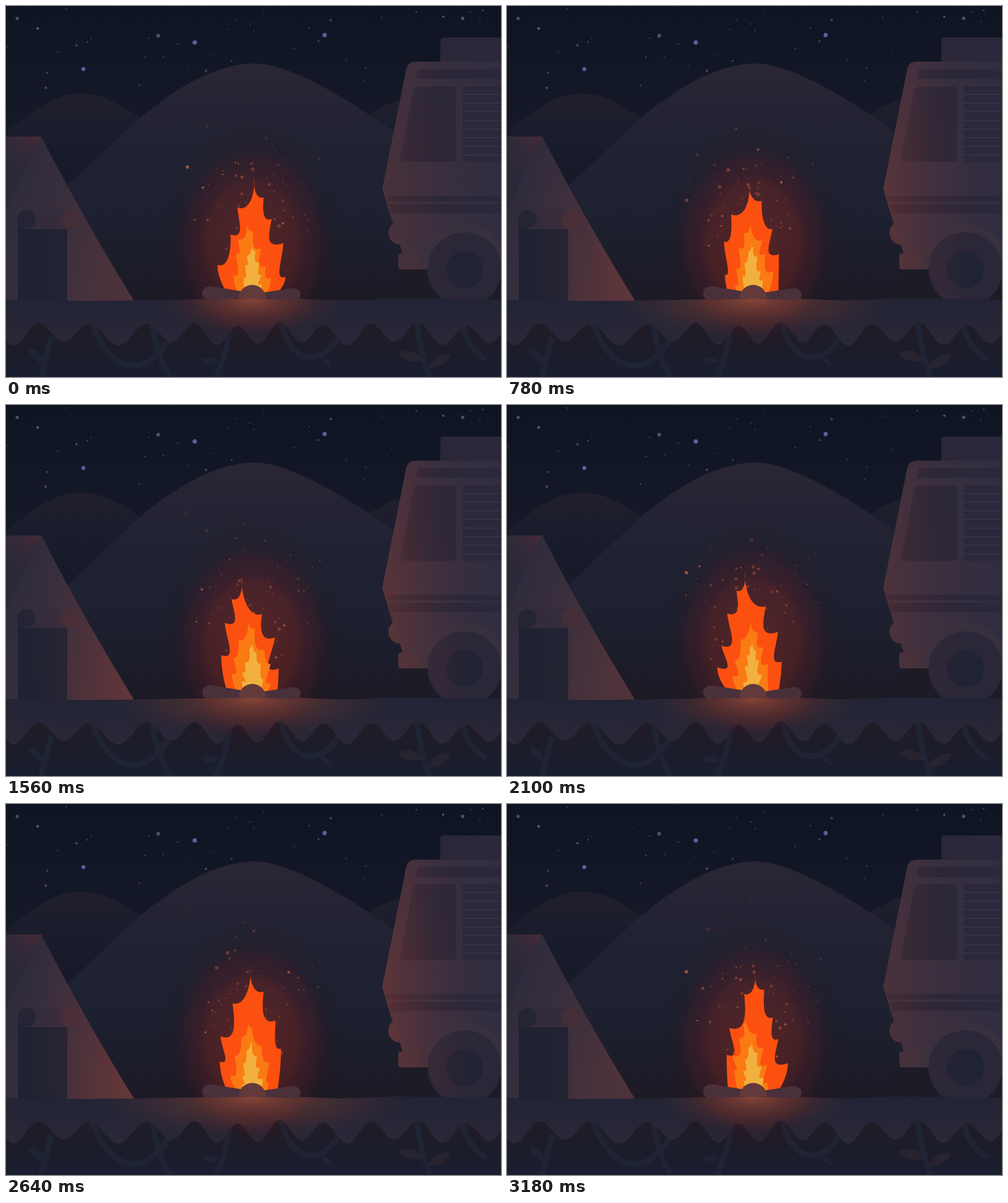
These frames come from a looping animation (800 px wide and 600 px high, 3.24 s). An HTML page:

```html
<!DOCTYPE html>
<html lang="en">
<head>
<meta charset="utf-8">
<title>Campfire</title>
<style>
  html, body { margin: 0; width: 100%; height: 100%; overflow: hidden; background: #101523; }
  svg { display: block; width: 800px; height: 600px; }
</style>
</head>
<body>
<svg viewBox="0 0 800 600">
  <defs>
    <linearGradient id="sky" x2="0" y2="1">
      <stop stop-color="#0f1423"/><stop offset=".4" stop-color="#161a29"/><stop offset="1" stop-color="#191a26"/>
    </linearGradient>
    <linearGradient id="farHill" gradientUnits="userSpaceOnUse" x1="0" y1="140" x2="0" y2="260">
      <stop stop-color="#211f2e"/><stop offset=".7" stop-color="#191c2c"/><stop offset="1" stop-color="#161a29"/>
    </linearGradient>
    <linearGradient id="nearHill" gradientUnits="userSpaceOnUse" x1="0" y1="93" x2="0" y2="476">
      <stop stop-color="#2a2636"/><stop offset=".32" stop-color="#212232"/><stop offset=".6" stop-color="#1d2131"/>
      <stop offset="1" stop-color="#1c1a25"/>
    </linearGradient>
    <linearGradient id="soil" gradientUnits="userSpaceOnUse" x1="0" y1="510" x2="0" y2="600">
      <stop stop-color="#201c26"/><stop offset=".4" stop-color="#1d1c28"/><stop offset="1" stop-color="#191e30"/>
    </linearGradient>
    <linearGradient id="turf" gradientUnits="userSpaceOnUse" x1="0" y1="473" x2="0" y2="550">
      <stop stop-color="#222435"/><stop offset=".4" stop-color="#252536"/><stop offset="1" stop-color="#2b2838"/>
    </linearGradient>
    <linearGradient id="vanBody" gradientUnits="userSpaceOnUse" x1="608" y1="0" x2="800" y2="0">
      <stop stop-color="#42303b"/><stop offset=".45" stop-color="#382f3f"/><stop offset="1" stop-color="#312d40"/>
    </linearGradient>
    <linearGradient id="vanDark" gradientUnits="userSpaceOnUse" x1="615" y1="0" x2="770" y2="0">
      <stop stop-color="#392934"/><stop offset=".55" stop-color="#2a2738"/><stop offset="1" stop-color="#2a283a"/>
    </linearGradient>
    <linearGradient id="tentFront" gradientUnits="userSpaceOnUse" x1="0" y1="330" x2="175" y2="400">
      <stop stop-color="#302c3d"/><stop offset=".55" stop-color="#392f3d"/><stop offset="1" stop-color="#45313b"/>
    </linearGradient>
    <linearGradient id="tentSide" gradientUnits="userSpaceOnUse" x1="0" y1="270" x2="50" y2="215">
      <stop stop-color="#2a2839"/><stop offset=".6" stop-color="#322a39"/><stop offset="1" stop-color="#422b36"/>
    </linearGradient>
    <radialGradient id="cast" gradientUnits="userSpaceOnUse" cx="398" cy="400" r="420"
      gradientTransform="translate(0 -400) scale(1 2)">
      <stop offset=".45" stop-color="#c04a34" stop-opacity=".34"/>
      <stop offset=".62" stop-color="#b04030" stop-opacity=".18"/>
      <stop offset=".86" stop-color="#903030" stop-opacity="0"/>
    </radialGradient>
    <radialGradient id="halo">
      <stop stop-color="#8a2c20" stop-opacity=".56"/>
      <stop offset=".48" stop-color="#76241f" stop-opacity=".48"/>
      <stop offset=".57" stop-color="#5c1c22" stop-opacity=".44"/>
      <stop offset=".7" stop-color="#4d1a21" stop-opacity=".36"/>
      <stop offset=".8" stop-color="#33161d" stop-opacity=".2"/>
      <stop offset="1" stop-color="#241219" stop-opacity="0"/>
    </radialGradient>
    <radialGradient id="pool">
      <stop stop-color="#d07048" stop-opacity=".42"/><stop offset=".45" stop-color="#b0502f" stop-opacity=".24"/>
      <stop offset="1" stop-color="#903828" stop-opacity="0"/>
    </radialGradient>
    <clipPath id="onTurf"><path class="turf"/></clipPath>
  </defs>

  <rect width="800" height="600" fill="url(#sky)"/>
  <g id="stars"></g>
  <path d="M0 205C40 172 75 142 120 142S190 165 218 181L330 260V480H0Z" fill="url(#farHill)"/>
  <path d="M540 205L585 176Q640 142 700 138L800 160V480H540Z" fill="url(#farHill)"/>
  <path d="M0 378L100 290L215 182C290 120 350 93 402 93S540 142 615 195L720 275V480H0Z" fill="url(#nearHill)"/>

  <path d="M0 211H57L0 331Z" fill="url(#tentSide)"/>
  <path d="M57 211Q133 358 209 480H0V331Z" fill="url(#tentFront)"/>
  <path d="M19 345H99V480H19Z" fill="#1f2232"/>
  <rect x="18" y="329" width="102" height="32" rx="16" fill="#332c3b"/>
  <circle cx="33" cy="345" r="15" fill="#252435"/>
  <circle cx="104" cy="345" r="16" fill="#402d38"/>
  <path class="cast" d="M0 211H57Q133 358 209 480H0Z" fill="url(#cast)"/>

  <path d="M702 92V56Q702 51 707 51H800V92Z" fill="url(#vanDark)"/>
  <circle cx="637" cy="367" r="19" fill="#42303b"/>
  <path d="M662 90H800V426H650L641 400L608 296L647 101Q650 90 662 90Z" fill="url(#vanBody)"/>
  <path d="M666 102H800V118H662ZM614 307H800V316H616ZM618 320H800V335H622Z" fill="url(#vanDark)"/>
  <path d="M667 130H722Q727 130 727 136V246Q727 252 721 252H642Q636 252 637 246L658 137Q660 130 667 130Z" fill="url(#vanDark)"/>
  <path d="M738 130H800V252H738Z" fill="#2a283a"/>
  <path id="slats" stroke="#373144" stroke-width="2"/>
  <path d="M640 400H690V480H640ZM690 426H800V480H690Z" fill="#1d1b25"/>
  <path d="M639 400H700V426H639Q634 426 634 421V405Q634 400 639 400Z" fill="#40303b"/>
  <path d="M669 426A72 73 0 0 1 813 426Z" fill="#38303e"/>
  <circle cx="741" cy="426" r="60" fill="#2a2738"/>
  <circle cx="741" cy="426" r="30" fill="#202334"/>
  <path class="cast" fill="url(#cast)" d="M702 90V56Q702 51 707 51H800V480H715Q690 465 682 426H639Q634 426 634 421V405Q634 400 641 400L637 386A19.2 19.2 0 0 1 624 353L608 296L647 101Q650 90 662 90Z"/>

  <path d="M0 500H800V600H0Z" fill="url(#soil)"/>
  <path fill="none" stroke="#1f2435" stroke-width="9" d="M139 512C155 560 180 582 208 582Q238 580 265 538M237 510Q240 560 266 602M363 512Q359 560 338 602M444 510C455 555 475 569 495 568Q522 564 537 536M73 536L56 602M663 506Q669 560 686 602M737 512Q743 550 776 572"/>
  <path d="M633 563Q655 548 676 573Q648 580 633 563M682 586Q690 562 718 564Q710 585 682 586" fill="#28242f"/>
  <path d="M36 554Q60 556 61 579Q40 574 36 554M315 572Q330 563 344 574Q328 584 315 572M508 569Q522 568 526 584Q514 582 508 569" fill="#1f2435"/>
  <path class="turf" fill="url(#turf)"/>
  <ellipse id="glow" cx="398" cy="382" rx="152" ry="194" fill="url(#halo)"/>
  <g clip-path="url(#onTurf)"><ellipse id="ground" cx="398" cy="476" fill="url(#pool)"/></g>

  <g id="sparks"></g>
  <path id="outer" fill="#fc5010"/>
  <path id="middle" fill="#fa7a13"/>
  <path id="inner" fill="#f2b13e"/>
  <path d="M331 453Q317 454 317 465Q318 474 326 475L398 473V463L378 461ZM398 464L418 463L464 456Q477 458 476 468Q475 476 468 476L398 473Z" fill="#4a303a"/>
  <path d="M376 473A22 22 0 0 1 420 473Z" fill="#633a3b"/>
</svg>
<script>
const LOOP = 3240, STEP = 60, AXIS = 398, BASE = 464;
const $ = id => document.getElementById(id);
const lerp = (a, b, k) => a + (b - a) * k;

function randomFrom(seed) {
  return () => (seed = (seed * 16807) % 2147483647) / 2147483647;
}

// Repeatable value between 0 and 1 for a pair of numbers
function hash(a, b) {
  const v = Math.sin(a * 12.9898 + b * 78.233) * 43758.5453;
  return v - Math.floor(v);
}

function add(parent, attributes) {
  const circle = document.createElementNS('http://www.w3.org/2000/svg', 'circle');
  for (const name in attributes) circle.setAttribute(name, attributes[name]);
  return parent.appendChild(circle);
}

function buildStars() {
  const random = randomFrom(29);
  for (let i = 0; i < 46; i++) {
    const r = 0.9 + 1.4 * random() ** 2;
    add($('stars'), { cx: 800 * random(), cy: 135 * random() ** 1.2, r, fill: i % 3 ? '#464459' : '#57547f' });
  }
  const brightest = [[305, 59], [515, 47], [125, 102], [246, 48], [738, 20], [18, 20]];
  brightest.forEach(([cx, cy], i) =>
    add($('stars'), { cx, cy, r: 3.6 - i * .2, fill: i < 3 ? '#625d9e' : '#504d73' }));
}

function buildTurf() {
  let d = 'M0 475C170 480 280 474 400 473S520 480 620 473L800 475';
  for (let x = 800; x >= 0; x -= 4) {
    const shifted = x - 12 - 25 * Math.exp(-(((x - 280) / 140) ** 2));
    d += `L${x} ${530 + 16 * Math.cos(shifted * 2 * Math.PI / 77) + 3 * Math.cos(x / 29)}`;
  }
  document.querySelectorAll('.turf').forEach(path => path.setAttribute('d', d + 'Z'));
}

function buildSlats() {
  let d = '';
  for (let y = 143; y < 250; y += 14) d += `M738 ${y}H800`;
  $('slats').setAttribute('d', d);
}

function buildSparks(count) {
  const random = randomFrom(71);
  const spread = () => random() + random() - 1;
  return Array.from({ length: count }, () => ({
    phase: random(),
    cycles: 2 + Math.floor(random() * 2),
    start: spread() * 115,
    drift: spread() * 90,
    from: 450 - 130 * random(),
    height: 80 + 120 * random(),
    sway: random() * 6.3,
    node: add($('sparks'), { r: 0.8 + 2.2 * random() ** 2, fill: random() < .2 ? '#c0663f' : '#8c4535' })
  }));
}

// One side of a flame: teeth climb from base to tip, each with a round pocket above it
function flameEdge(side, { width, tipX, tipY, gap, cycles, seed }, t) {
  const height = BASE - tipY;
  const climb = t / LOOP * cycles + (side > 0 ? .5 : 0);
  const offset = climb - Math.floor(climb);
  const points = [[AXIS + side * width * .74, BASE]];
  let pocket = 0;

  const join = ([x, y]) => {
    const [px, py] = points[points.length - 1];
    const rise = py - y;
    points.push([px - side * pocket, py + pocket * .35], [x - side * pocket * .1, y + rise * .5], [x, y]);
  };
  for (let j = 0; j < height / gap + 1; j++) {
    const id = (j - Math.floor(climb) + 2 * cycles) % cycles;
    const y = BASE - gap * (j + offset + .4 * hash(id, seed + side));
    const s = (BASE - y) / height;
    if (s > .93) break;
    if (s < .1) continue;
    const reach = width * (.74 + .26 * Math.min(1, s * 4)) * (1 - s ** 2.1);
    const wide = reach * (.86 + .26 * hash(id, seed + side * 3));
    join([lerp(AXIS, tipX, s) + side * wide, y]);
    pocket = Math.min(wide * .8, gap * (.25 + .5 * hash(id, seed + side * 5)));
  }
  join([tipX, tipY]);
  return points;
}

function flamePath(shape, t) {
  const left = flameEdge(-1, shape, t);
  const right = flameEdge(1, shape, t).reverse();
  return `M${left[0]}C${left.slice(1).join(' ')}C${right.slice(1).join(' ')}Z`;
}

buildStars();
buildTurf();
buildSlats();
const sparks = buildSparks(115);

function draw(t) {
  const turn = 2 * Math.PI * t / LOOP;
  const light = .48 - .35 * Math.cos(3 * turn) - .12 * Math.cos(2 * turn);
  const tipX = 391 + 10 * Math.cos(turn);
  const tipY = 276 + 10 * Math.sin(turn);

  $('outer').setAttribute('d', flamePath({ width: 55, tipX, tipY, gap: 44, cycles: 44, seed: 3 }, t));
  $('middle').setAttribute('d', flamePath({
    width: 33, tipX: 389 + 5 * Math.sin(5 * turn), tipY: 347 + 5 * Math.sin(4 * turn), gap: 27, cycles: 60, seed: 8
  }, t));
  $('inner').setAttribute('d', flamePath({
    width: 17, tipX: 397 + 2 * Math.sin(7 * turn), tipY: 382 + 3 * Math.sin(6 * turn), gap: 19, cycles: 80, seed: 14
  }, t));

  document.querySelectorAll('.cast').forEach(path => path.setAttribute('opacity', .2 + .75 * light));
  $('glow').setAttribute('opacity', .92 + .08 * light);
  $('ground').setAttribute('rx', 150 + 110 * light);
  $('ground').setAttribute('ry', 54 + 10 * light);

  sparks.forEach(({ phase, cycles, start, drift, from, height, sway, node }) => {
    const p = (t / LOOP * cycles + phase) % 1;
    node.setAttribute('cx', AXIS + start + drift * p + 7 * Math.sin(p * 9 + sway));
    node.setAttribute('cy', from - height * p);
    node.setAttribute('opacity', .75 * Math.sin(Math.PI * p));
  });
}

const started = performance.now();
function tick() {
  const t = (performance.now() - started) % LOOP;
  draw(Math.floor(t / STEP) * STEP);
  requestAnimationFrame(tick);
}
tick();
</script>
</body>
</html>
```
